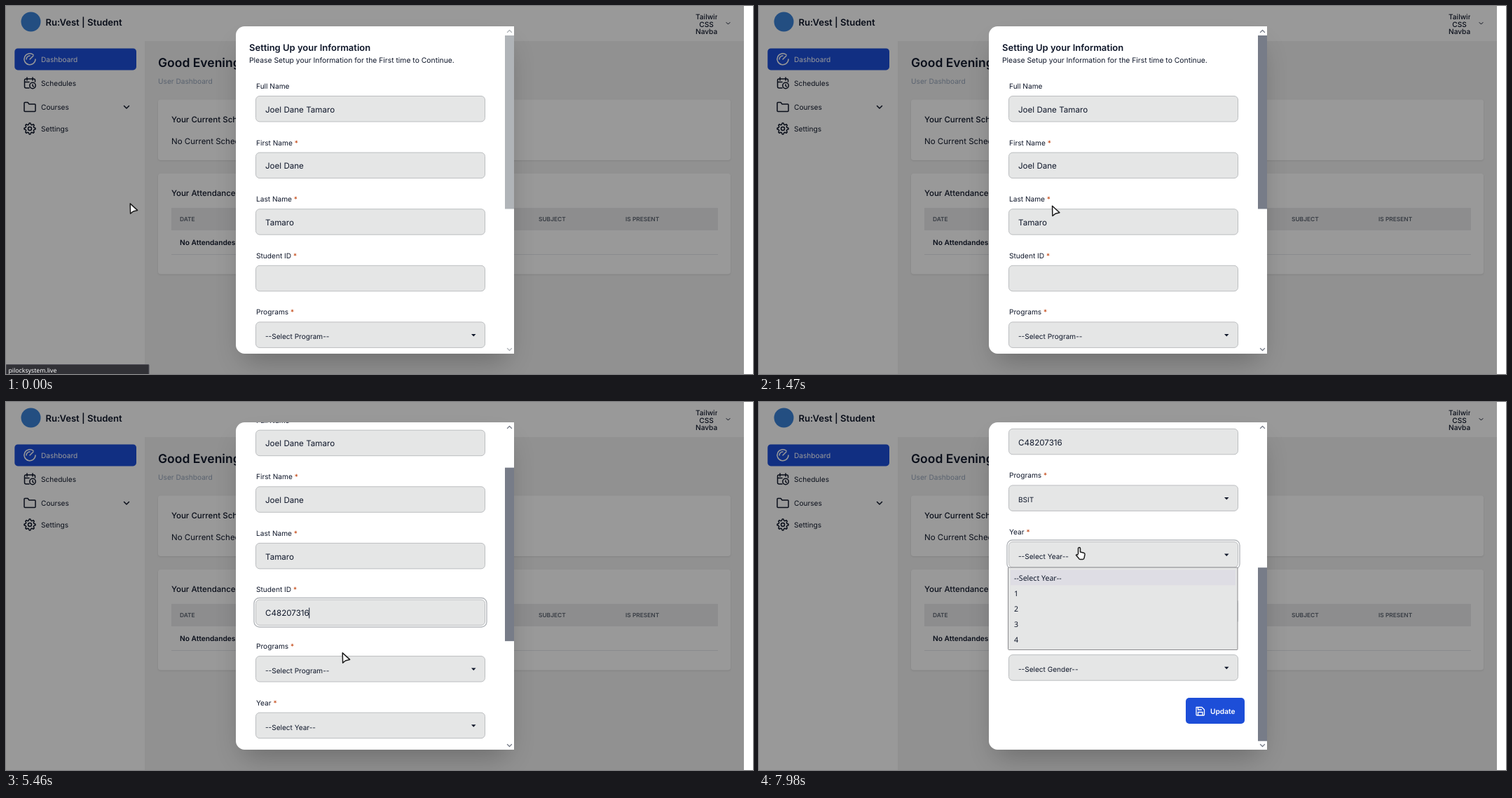
An HTML page for the animation above (8000 ms loop, 1066 by 525 pixels).

```html
<!DOCTYPE html>
<html lang="en">
<head>
<meta charset="utf-8">
<title>Student setup form</title>
<style>
  html, body { margin: 0; width: 100%; height: 100%; overflow: hidden; background: #fff; }
  svg { display: block; width: 1066px; height: 525px; font: 10.15px Inter, sans-serif; fill: #0f172a; text-rendering: geometricPrecision; }
  .medium { font-weight: 500; }
  .semi { font-weight: 600; }
  .system { font-family: "Noto Sans", "Open Sans", sans-serif; }
  .card { fill: #fff; filter: drop-shadow(0 1px 1px #0000001a); }
  .line { fill: none; stroke: #0f172a; stroke-width: 1.5; stroke-linecap: round; stroke-linejoin: round; }
  .field { fill: #e5e6e6; stroke: #bcbec0; }
  .ring { fill: none; stroke: #b4b7bb; stroke-width: 1.4; }
  .star { fill: #c2410c; }
  .pointer path { fill: #fff; stroke: #1b1b1b; stroke-width: 1.5; stroke-linejoin: round; }
</style>
</head>
<body>
<script>
const DURATION = 8000, STEP = 70, ROW = 80.6, FIELD_TOP = 128.5;
const NAMES = ['Joel Dane Tamaro', 'Joel Dane', 'Tamaro'];
const IDS = ['C48207316', 'C48207319'];
const FIELDS = ['Full Name', 'First Name', 'Last Name', 'Student ID', 'Programs', 'Year', 'Block', 'Gender'];
const PROGRAMS = ['--Select Program--', 'BSIT', 'BSCS', 'BLIS', 'BSIS'];
const YEARS = ['--Select Year--', '1', '2', '3', '4'];
const PROMPTS = { 4: PROGRAMS[0], 5: YEARS[0], 6: '--Select Block--', 7: '--Select Gender--' };

const fieldTop = i => FIELD_TOP + i * ROW;
const text = (x, y, string, size = 10.15, attrs = '') =>
  `<text x="${x}" y="${y}" font-size="${size}" ${attrs}>${string}</text>`;
const rect = (x, y, w, h, r = 0, attrs = '') =>
  `<rect x="${x}" y="${y}" width="${w}" height="${h}" rx="${r}" ${attrs}/>`;
const line = (d, attrs = '') => `<path class="line" d="${d}" ${attrs}/>`;

const gear = () => {
  let d = '';
  for (let i = 0; i < 32; i++) {
    const a = (i - .5) * Math.PI / 16, r = i % 4 < 2 ? 8 : 6;
    d += `${i ? 'L' : 'M'}${34 + r * Math.cos(a)} ${175 + r * Math.sin(a)}`;
  }
  return line(d + 'Z') + '<circle class="line" cx="34" cy="175" r="2.5"/>';
};

const sidebar = () =>
  rect(12.3, 60.4, 173.7, 31, 4.6, 'fill="#1d4ed8"') +
  line('M39 69.5A8 8 0 1 0 42 76M34 76l5-5M29 76a5 5 0 0 1 5-5', 'style="stroke:#fff"') +
  text(50, 79.7, 'Dashboard', 10.15, 'fill="#fff"') +
  line('M33 117H28.5a2 2 0 0 1-2-2V106a2 2 0 0 1 2-2H39.5a2 2 0 0 1 2 2V108M30 102v4M38 102v4M26.5 108.5H33M38 112v2l1.5 1') +
  '<circle class="line" cx="38" cy="113.5" r="4.2"/>' + text(50, 113.7, 'Schedules') +
  line('M26 149.5V138.5a1 1 0 0 1 1-1h4l2 2.5h8a1 1 0 0 1 1 1v8.5a1 1 0 0 1-1 1H27a1 1 0 0 1-1-1Z') +
  text(50, 147.7, 'Courses') + line('M168.5 142.5l3.5 3.5 3.5-3.5') +
  gear() + text(50, 178.7, 'Settings');

const page = () =>
  rect(0, 0, 1053, 525, 0, 'fill="#fff"') + rect(198, 50, 855, 475, 0, 'fill="#f1f1f1"') +
  '<circle id="logo" cx="35.5" cy="22.5" r="14" fill="#3b82d6"/>' +
  text(56.5, 28, 'Ru:Vest | Student', 13.1, 'class="semi"') +
  '<g clip-path="url(#avatar)" class="medium">' + text(984, 18.8, 'Tailwind') +
  text(999.5, 29.6, 'CSS', 10.15, 'text-anchor="middle"') + text(984, 40.4, 'Navbar') + '</g>' +
  line('M1028 23.5l2.5 2.5 2.5-2.5', 'style="stroke-width:1"') +
  sidebar() +
  text(217, 87, 'Good Evening, !', 17.5, 'class="semi"') +
  text(217, 111, 'User Dashboard', 10.15, 'fill="#94a3b8"') +
  rect(217, 133.5, 817, 86.5, 4, 'class="card"') +
  text(236, 165.5, 'Your Current Schedule', 11.5, 'class="medium"') +
  text(236, 196.5, 'No Current Schedules Found', 11.5) +
  rect(217, 239, 817, 143.5, 4, 'class="card"') +
  text(236, 271, 'Your Attendances', 11.5, 'class="medium"') +
  rect(236, 288, 780, 32, 0, 'fill="#ebebec"') +
  [['DATE', 248], ['FACULTY', 513], ['SECTION', 637], ['SUBJECT', 760], ['IS PRESENT', 884]]
    .map(([s, x]) => text(x, 306.5, s, 8.4, 'class="semi" fill="#5b6370"')).join('') +
  text(248, 341, 'No Attendandes Found', 10.2, 'class="semi"') +
  rect(236, 354, 780, 1, 0, 'fill="#e5e7eb"');

const fieldRow = (label, i) => {
  const y = fieldTop(i);
  return `<text x="357" y="${y - 10.5}">${label}${i ? ' <tspan class="star">*</tspan>' : ''}</text>` +
    rect(356.5, y, 327, 36.5, 5.5, 'class="field"') +
    text(370, y + (i < 4 ? 23.3 : 24.5), PROMPTS[i] || '', i < 4 ? 11.6 : 10.05, `id="value${i}"`) +
    (i < 4 ? '' : `<path d="M664 ${y + 17}h6.5l-3.25 3.5Z"/>`);
};

const menu = (id, i, options) => {
  const y = fieldTop(i) + 36.5;
  return `<g id="${id}" class="system">` + rect(355.5, y, 327.5, 117.5, 1, 'fill="#e5e6e6" stroke="#8b8b8e"') +
    rect(359, y + 3.5, 321, 21.9, 0, 'class="hover" fill="#dedde4"') +
    options.map((s, n) => text(364, y + 19.3 + n * 21.9, s, 10.6)).join('') + '</g>';
};

const suggestions = () => {
  const y = fieldTop(3) + 37.3;
  return '<g id="suggest" class="system" fill="#fbfbfe">' +
    rect(355.5, y, 328, 32.5, 1, 'fill="#2b2a33" stroke="#a9a9ad"') +
    rect(356, y + .5, 327, 15.5, 0, 'id="picked" fill="#5b5b66"') +
    IDS.map((s, n) => text(360, y + 12 + n * 15.7, s, 8.8)).join('') + '</g>';
};

const modal = () =>
  rect(0, 0, 1053, 525, 0, 'fill="#000" opacity=".4"') +
  rect(337.5, 58, 378, 448, 12, 'fill="#000" opacity=".25" style="filter:blur(19px)"') +
  '<path d="M340.4 29H725V496H340.4a12.4 12.4 0 0 1-12.4-12.4V41.4a12.4 12.4 0 0 1 12.4-12.4Z" fill="#fff"/>' +
  '<g clip-path="url(#panel)"><g id="content">' +
  text(347, 63.5, 'Setting Up your Information', 13, 'class="semi"') +
  text(347, 81, 'Please Setup your Information for the First time to Continue.', 10.35) +
  FIELDS.map(fieldRow).join('') +
  rect(354, 0, 332, 41.5, 7.5, 'id="ring" class="ring"') +
  rect(0, fieldTop(3) + 11.5, 1, 15, 0, 'id="caret"') +
  rect(609, 754, 84, 37, 5, 'fill="#1d4ed8"') +
  line('M624 767.5h8l3.5 3.5v7a1 1 0 0 1-1 1H625a1 1 0 0 1-1-1ZM626.5 767.5v3.5h5M626.5 779v-4.5h6.5V779', 'style="stroke:#fff;stroke-width:1.3"') +
  text(644, 776.5, 'Update', 10.2, 'class="semi" fill="#fff"') +
  suggestions() + menu('programs', 4, PROGRAMS) + menu('years', 5, YEARS) +
  '</g></g><g id="scrollbar">' +
  rect(712, 0, 13, 247.5, 0, 'id="thumb" fill="currentColor"') +
  line('M715.5 37.5l3-3 3 3M715.5 488.5l3 3 3-3', 'style="stroke:currentColor;stroke-width:1.3"') + '</g>';

const pointers = () =>
  '<g id="arrow" class="pointer"><path d="M1.2.9L1.6 15.2 5.5 12 11.6 10.4Z"/></g>' +
  '<g id="beam">' + line('M-3-6.5H-1L0-6 1-6.5H3M0-6V6M-3 6.5H-1L0 6 1 6.5H3', 'style="stroke-width:1.1;stroke:#222"') + '</g>' +
  '<g id="hand" class="pointer"><path d="M-1.5 9V1a1.5 1.5 0 0 1 3 0V6l5 1.2q1.8.6 1.5 2.5l-1 5q-.4 1.8-2 1.8H1.5q-1.2 0-2-1.2L-4.5 10.5q.8-2 3-.2"/></g>';

document.body.innerHTML = `<svg viewBox="0 0 1066 525">
  <defs>
    <clipPath id="avatar">${rect(984, 8, 31, 33)}</clipPath>
    <clipPath id="panel">${rect(328, 29, 384, 467, 12)}</clipPath>
  </defs>
  ${page()}<g id="modal">${modal()}</g>
  <g id="status" class="system">${rect(0, 511.5, 204, 14, 1, 'fill="#313136" stroke="#55545c"')}
  ${text(3.5, 522.8, '', 8.7, 'id="address" fill="#fff"')}</g>
  ${pointers()}</svg>`;

const el = id => document.getElementById(id);
const show = (id, on) => el(id).setAttribute('visibility', on ? 'visible' : 'hidden');
const move = (id, x, y) => el(id).setAttribute('transform', `translate(${x} ${y})`);
const within = (t, from, to) => t >= from && t < to;

// Eased value at time t from [time, ...values] keys.
function track(keys, t) {
  const next = keys.findIndex(k => k[0] > t);
  if (next < 0) return keys.at(-1).slice(1);
  const [a, b] = [keys[next - 1], keys[next]];
  const u = (t - a[0]) / (b[0] - a[0]), ease = u * u * (3 - 2 * u);
  return a.slice(1).map((v, i) => v + (b[i + 1] - v) * ease);
}

const SCROLL = [[0, 0], [1470, 0], [1750, 88.3], [5460, 88.3], [5600, 332]];
const POINTER = [
  [0, 176, 281], [770, 176, 281], [910, 184, 282], [1120, 184, 282], [1540, 436, 284.5], [1820, 436, 284.5],
  [1960, 441, 297], [4900, 441, 297], [5250, 485, 365], [5390, 479, 357], [5670, 479, 357], [5950, 560, 290],
  [6300, 437, 205], [6440, 436, 206], [6650, 432, 212], [6930, 470, 140], [7070, 490, 174],
  [7280, 427, 185], [7560, 427, 185], [7840, 457, 208]
];

function typedId(t) {
  const count = t < 3150 ? 0 : t < 3500 ? 1 : t < 3640 ? 2 : t < 4130 ? 3 : 9;
  return IDS[0].slice(0, count);
}

function pointerKind(x, y, scroll, menuOpen) {
  if (x < 356 || x > 684) return 'arrow';
  const i = FIELDS.findIndex((_, n) => within(y + scroll, fieldTop(n), fieldTop(n) + 37));
  if (i < 0 || (menuOpen && i > 4)) return 'arrow';
  return i < 4 ? 'beam' : 'hand';
}

function render(t) {
  const [scroll] = track(SCROLL, t), [x, y] = track(POINTER, t);

  const fade = Math.min(1, Math.max(0, (t - 100) / 200));
  el('modal').setAttribute('opacity', t < 140 ? 1 : 1 - (1 - fade) ** 3);
  show('logo', !within(t, 140, 700));
  show('status', t < 910);
  el('address').textContent = (t < 140 ? '' : 'Read ') + (t < 490 ? '' : 'cdn.') + 'pilocksystem.live';

  NAMES.forEach((name, i) => el('value' + i).textContent = within(t, 140, 630) ? '' : name);
  el('value3').textContent = typedId(t);
  el('value4').textContent = PROGRAMS[t < 7630 ? 0 : 1];

  move('content', 0, -scroll);
  el('thumb').setAttribute('y', 42 + scroll * .585);
  el('scrollbar').setAttribute('color', t < 1470 ? '#b0b4b8' : '#777c88');

  const focus = within(t, 2170, 6860) ? 3 : within(t, 6860, 7700) ? 4 : t >= 7840 ? 5 : -1;
  show('ring', focus >= 0);
  el('ring').setAttribute('y', fieldTop(focus) - 2.5);
  const blink = (t - (t < 3150 ? 2170 : 4060)) % 980 < 490;
  show('caret', focus === 3 && (blink || within(t, 3150, 4060)));
  el('caret').setAttribute('x', 369.5 + el('value3').getComputedTextLength());

  show('suggest', within(t, 3220, 4130));
  show('picked', within(t, 3990, 4130));
  const programsOpen = within(t, 6930, 7630);
  show('programs', programsOpen);
  show('years', t >= 7910);
  const hovered = Math.max(0, Math.floor((y + scroll - fieldTop(4) - 40) / 21.9));
  el('programs').querySelector('.hover').setAttribute('y', fieldTop(4) + 40 + Math.min(4, hovered) * 21.9);

  const kind = pointerKind(x, y, scroll, programsOpen);
  for (const id of ['arrow', 'beam', 'hand']) {
    show(id, id === kind && !within(t, 3150, 4970));
    move(id, x, y);
  }
}

function tick() {
  const t = performance.now() % DURATION;
  render(t - t % STEP);
  requestAnimationFrame(tick);
}
tick();
</script>
</body>
</html>
```
